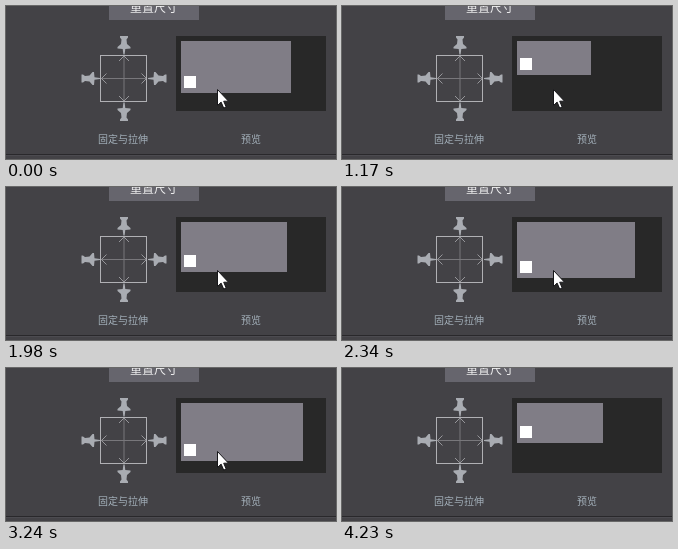
Recreate the animation shown at these times as an HTML page with a canvas. Size 330x153 px, loop 4310 ms.

```html
<!DOCTYPE html>
<html lang="zh-CN">
<head>
<meta charset="utf-8">
<style>
  html, body { margin: 0; width: 100%; height: 100%; overflow: hidden; background: #434246; }
  canvas { display: block; }
</style>
</head>
<body>
<canvas id="stage" width="330" height="153"></canvas>
<script>
const ctx = document.getElementById('stage').getContext('2d');
const LOOP = 4310, STEP = 90, LAST = 47;
const PAUSES = [4, 12, 19, 25, 33, 40, 46];
const CENTER = { x: 118, y: 72.5 };
const FONT = '"Noto Sans CJK SC", "Noto Sans CJK", sans-serif';

function box(x, y, w, h, color) {
  ctx.fillStyle = color;
  ctx.fillRect(x, y, w, h);
}

function trace(points, closed) {
  ctx.beginPath();
  points.forEach(([x, y]) => ctx.lineTo(x, y));
  if (closed) ctx.closePath();
}

function label(text, x, y, size, color) {
  ctx.font = `${size}px ${FONT}`;
  ctx.fillStyle = color;
  ctx.fillText(text, x, y);
}

// Pin and arrowhead for one side, drawn pointing up and then rotated.
function side(turn) {
  ctx.save();
  ctx.translate(CENTER.x, CENTER.y);
  ctx.rotate(turn * Math.PI / 2);

  const half = [[4, -42.5], [4, -41], [2.5, -39], [3, -34.5],
                [6.5, -31.5], [6.5, -30], [1.3, -29.5], [0.6, -24]];
  const mirror = half.map(([x, y]) => [-x, y]).reverse();
  trace([...half, ...mirror], true);
  ctx.fillStyle = '#a9acb2';
  ctx.fill();

  ctx.lineWidth = 1;
  ctx.strokeStyle = '#78777b';
  trace([[0, 0], [0, -23]]);
  ctx.stroke();
  ctx.strokeStyle = '#96969a';
  trace([[-5, -17.5], [0, -22.5], [5, -17.5]]);
  ctx.stroke();
  ctx.restore();
}

function drawPanel() {
  box(0, 0, 330, 153, '#434246');
  box(103, 0, 90, 14, '#66656d');
  label('重置尺寸', 124, 6, 12, '#f2f2f2');

  for (let turn = 0; turn < 4; turn++) side(turn);
  ctx.lineWidth = 1;
  ctx.strokeStyle = '#b0b0b4';
  ctx.strokeRect(94.5, 49.5, 46, 46);

  label('固定与拉伸', 92, 137, 10, '#a3b0ba');
  label('预览', 235, 137, 10, '#a3b0ba');
  box(0, 148, 330, 1, '#29282b');
  box(0, 149, 330, 1, '#4c4b50');
  box(170, 30, 150, 75, '#282828');
}

function drawPreview(frame) {
  const n = frame - PAUSES.filter(p => p <= frame).length;
  const right = n <= 27 ? 245 + 4 * Math.abs(n - 10) : 313 - 4 * (n - 27);
  const bottom = (right - 111) / 2;
  box(175, 35, right - 175, bottom - 35, '#807d86');
  box(178, bottom - 17, 12, 12, '#ffffff');
}

function drawCursor(frame) {
  const moved = Math.max(0, frame - 39);
  if (moved > 3) return;
  ctx.save();
  ctx.translate(211.5 + moved, 83.5 + 6 * moved * moved);
  trace([[0, 0], [0, 16], [3.6, 12.6], [6.2, 18.6],
         [8.7, 17.5], [6.2, 11.7], [11, 11.7]], true);
  ctx.fillStyle = '#ffffff';
  ctx.fill();
  ctx.lineWidth = 1;
  ctx.strokeStyle = '#17171a';
  ctx.stroke();
  ctx.restore();
}

function render() {
  const time = performance.now() % LOOP;
  const frame = Math.min(LAST, Math.floor(time / STEP));
  drawPanel();
  drawPreview(frame);
  drawCursor(frame);
  requestAnimationFrame(render);
}
render();
</script>
</body>
</html>
```
